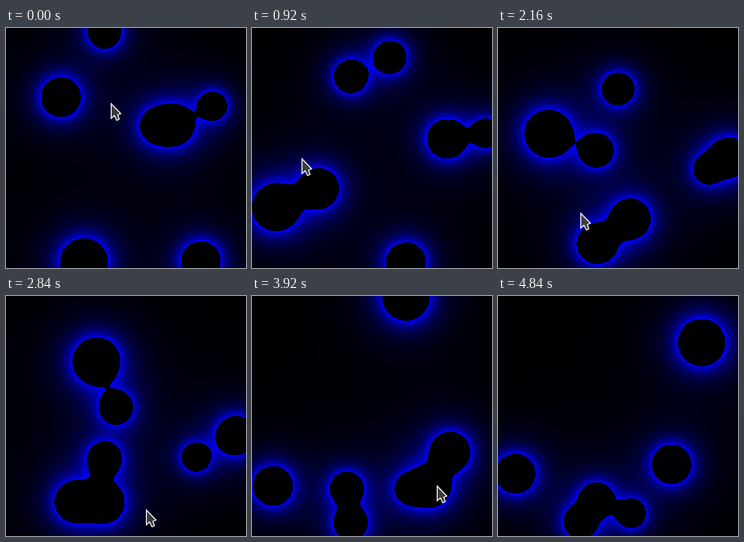
Write an HTML page with a canvas that moves like this. It is 300 by 300 pixels and loops after 4880 ms.

```html
<!DOCTYPE html>
<html lang="en">
<head>
<meta charset="utf-8">
<title>Metaballs</title>
<style>
  html, body { margin: 0; width: 100%; height: 100%; overflow: hidden; background: #000; }
  canvas { display: block; width: 300px; height: 300px; image-rendering: pixelated; }
</style>
</head>
<body>
<canvas id="stage" width="300" height="300"></canvas>
<script>
const SIZE = 300, STEP = 40, LOOP = 4880, LAG = 5, TOP = -2;
const ctx = document.getElementById('stage').getContext('2d');
const image = ctx.createImageData(SIZE, SIZE);
const pixels = new Uint32Array(image.data.buffer);

// Radius, start and velocity per step
const balls = [
  { r: 29.6, x: 97, y: 292, vx: -2.949, vy: -2.972 },
  { r: 24.8, x: 243, y: 291, vx: -2.22, vy: 0.735 },
  { r: 24.5, x: 209.3, y: 120.8, vx: 1.464, vy: 0.748 },
  { r: 17.8, x: 258, y: 97, vx: 1.479, vy: 1.465 },
  { r: 20.8, x: 122.7, y: 4.5, vx: 0, vy: -2.98 },
  { r: 20.4, x: 188.8, y: 121.8, vx: -0.725, vy: -3.73 }
];
const CHASER = 24.8;

// Pointer path: step, x, y
const path = [
  [-10, 20, 88], [-5, 68, 86], [0, 131, 94], [7, 168, 145], [13, 130, 205],
  [18, 83, 200], [23, 62, 163], [28, 110, 105], [34, 204, 115], [39, 223, 139],
  [44, 215, 195], [49, 165, 238], [54, 103, 231], [58, 76, 228], [62, 83, 247],
  [66, 122, 258], [71, 175, 267], [78, 212, 262], [86, 205, 245], [93, 222, 238],
  [98, 231, 237], [104, 275, 220], [110, 380, 190], [130, 420, 180]
];

// Reflect v between two walls
function bounce(v, lo, hi) {
  const span = hi - lo, m = (((v - lo) % (2 * span)) + 2 * span) % (2 * span);
  return lo + (m > span ? 2 * span - m : m);
}

function slope(i, k) {
  const a = path[Math.max(i - 1, 0)], b = path[Math.min(i + 1, path.length - 1)];
  return (b[k] - a[k]) / (b[0] - a[0]);
}

function pointerAt(n) {
  let i = 0;
  while (path[i + 1][0] < n) i++;
  const a = path[i], b = path[i + 1], h = b[0] - a[0], u = (n - a[0]) / h, w = 1 - u;
  const at = k => w * w * ((1 + 2 * u) * a[k] + u * h * slope(i, k)) +
                  u * u * ((3 - 2 * u) * b[k] - w * h * slope(i + 1, k));
  return { x: at(1), y: at(2) };
}

function drawField(list) {
  for (let y = 0, p = 0; y < SIZE; y++) {
    for (let x = 0; x < SIZE; x++, p++) {
      let sum = 0;
      for (const b of list) {
        const dx = x - b.x, dy = y - b.y, q = dx * dx + dy * dy + 0.01;
        sum += b.r ** 3 / (q * Math.sqrt(q));
      }
      const blue = sum < 1 ? Math.floor(sum * 255) : 0;
      pixels[p] = (0xff000000 | blue << 16) >>> 0;
    }
  }
  ctx.putImageData(image, 0, 0);
}

const arrow = new Path2D('M.5 .5V19L4.5 15.5 7.5 21.5 10.5 20 8.7 14.5 12.5 13Z');

function drawPointer({ x, y }) {
  ctx.save();
  ctx.translate(Math.round(x), Math.round(y));
  ctx.fillStyle = '#3c3c3c';
  ctx.fill(arrow);
  ctx.strokeStyle = '#fff';
  ctx.lineWidth = 1.2;
  ctx.stroke(arrow);
  ctx.restore();
}

function draw(step) {
  // Two short stalls near the end
  const n = step - (step >= 105) - (step >= 115);
  const list = balls.map(b => ({
    r: b.r,
    x: bounce(b.x + b.vx * n, 0, SIZE),
    y: bounce(b.y + b.vy * n, TOP, SIZE)
  }));
  list.push({ r: CHASER, ...pointerAt(n - LAG) });
  drawField(list);
  drawPointer(pointerAt(n));
}

const start = performance.now();
let last = -1;
function tick() {
  const step = Math.floor(((performance.now() - start) % LOOP) / STEP);
  if (step !== last) draw(last = step);
  requestAnimationFrame(tick);
}
tick();
</script>
</body>
</html>
```
